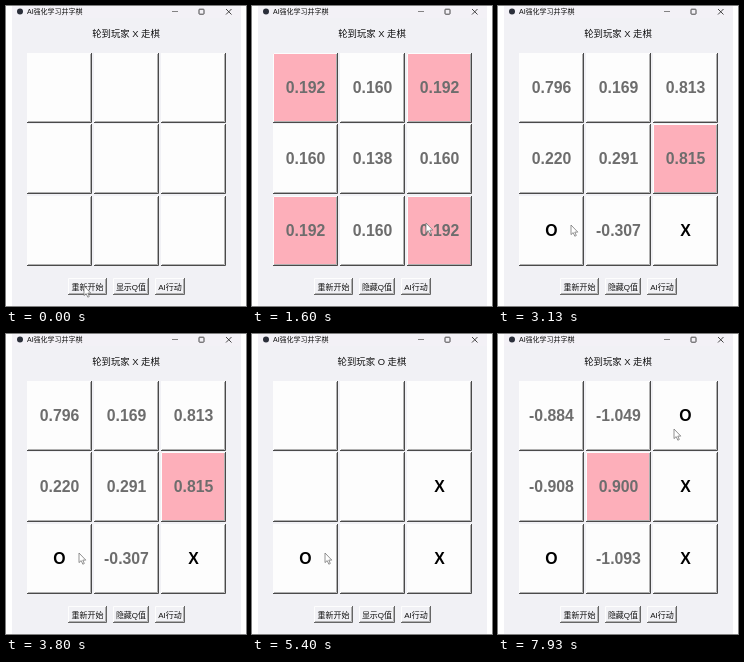
An HTML page for the animation above (8000 ms loop, 240 by 300 pixels).

```html
<!DOCTYPE html>
<html lang="zh-CN">
<head>
<meta charset="utf-8">
<style>
html, body { margin: 0; width: 100%; height: 100%; overflow: hidden; background: #fff; }
svg { display: block; width: 100vw; height: 100vh; }
text { font-family: "Liberation Sans", "Noto Sans CJK SC", "Noto Sans CJK", sans-serif; fill: #111; text-anchor: middle; }
.mark { font-size: 15.8px; font-weight: bold; }
.btn { font-size: 8px; font-weight: 500; }
</style>
</head>
<body>
<svg id="stage" viewBox="0 0 240 300">
  <rect width="240" height="300" fill="#fff"/>
  <rect x="6" width="229" height="300" fill="#f1f1f5"/>
  <rect x="6" width="229" height="12" fill="#f3f1f6"/>
  <circle cx="14" cy="5.5" r="3" fill="#2b2f3a"/>
  <text x="21" y="8.2" font-size="7" style="text-anchor:start">AI强化学习井字棋</text>
  <g fill="none" stroke="#333" stroke-width=".9">
    <path d="M166 5.5h6" stroke="#777"/>
    <path d="M220 3l5.5 5.5M225.5 3l-5.5 5.5"/>
    <rect x="193" y="3.2" width="5" height="5" rx=".6"/>
  </g>
  <text id="status" x="120" y="31.2" font-size="9.4"></text>
</svg>
<script>
const LOOP = 8000;
const PINK = '#fdafba', PLAIN = '#fdfdfd';
const stage = document.getElementById('stage');
const status = document.getElementById('status');

function add(tag, attrs, text = '') {
  const el = document.createElementNS('http://www.w3.org/2000/svg', tag);
  for (const k in attrs) el.setAttribute(k, attrs[k]);
  el.textContent = text;
  stage.append(el);
  return el;
}

// Raised button: light top-left edge, dark bottom-right edge.
function raised(x, y, w, h, fill, dark) {
  const face = add('rect', { x, y, width: w, height: h, fill });
  const edge = (d, stroke) => add('path', { d, stroke, fill: 'none' });
  edge(`M${x + .5} ${y + h - 1}V${y + .5}H${x + w - 1}`, '#fdfdfd');
  edge(`M${x + 1} ${y + h - 1.5}H${x + w - 1.5}V${y + 1}`, '#b0b0b0');
  edge(`M${x} ${y + h - .5}H${x + w - .5}V${y}`, dark);
  return face;
}

const cells = Array.from({ length: 9 }, (_, i) => {
  const x = [21, 88, 155][i % 3], y = [47, 118, 190][Math.floor(i / 3)];
  return {
    face: raised(x, y, 65, 70, PLAIN, '#4a4a4a'),
    label: add('text', { x: x + 32.5, y: y + 40, class: 'mark' })
  };
});

const [, toggle] = [[62, 39, '重新开始'], [107, 36, '显示Q值'], [149, 30, 'AI行动']].map(([x, w, s]) => {
  raised(x, 272, w, 17, '#f1f1f5', '#666');
  return add('text', { x: x + w / 2, y: 283.5, class: 'btn' }, s);
});

const cursor = add('path', {
  d: 'M0 0V9.6L2.2 7.6L3.8 11.2L5.3 10.5L3.8 7.1H6.8Z',
  fill: '#fff', stroke: '#777', 'stroke-width': .8
});

// Board states: start time, turn, nine cells, Q values visible.
const scenes = [
  [0, 'X', '. . . . . . . . .', false],
  [800, 'X', '0.192 0.160 0.192 0.160 0.138 0.160 0.192 0.160 0.192', true],
  [2000, 'O', '. . . . . . . . X', false],
  [2900, 'X', '0.796 0.169 0.813 0.220 0.291 0.815 O -0.307 X', true],
  [4600, 'O', '. . . . . X O . X', false],
  [6000, 'X', '-0.884 -1.049 O -0.908 0.900 X O -1.093 X', true]
];

// Pointer stops: time, x, y.
const stops = [
  [0, 78, 280], [250, 78, 280], [600, 124, 280], [900, 124, 280],
  [1400, 174, 217], [2020, 174, 217], [2370, 75, 218], [2420, 75, 218],
  [2600, 73, 219], [5500, 73, 219], [5950, 176, 95], [LOOP, 176, 95]
];

function pointerAt(t) {
  const i = stops.findIndex(s => s[0] > t);
  const [t0, x0, y0] = stops[i - 1], [t1, x1, y1] = stops[i];
  const p = (t - t0) / (t1 - t0), e = p * p * (3 - 2 * p);
  return [x0 + (x1 - x0) * e, y0 + (y1 - y0) * e];
}

let shown;
function showScene(scene) {
  if (scene === shown) return;
  shown = scene;
  const [, turn, board, showQ] = scene;
  const values = board.split(' ');
  const best = Math.max(...values.map(Number).filter(v => !isNaN(v)));
  status.textContent = `轮到玩家 ${turn} 走棋`;
  toggle.textContent = showQ ? '隐藏Q值' : '显示Q值';
  cells.forEach(({ face, label }, i) => {
    const v = values[i];
    label.textContent = v === '.' ? '' : v;
    label.style.fill = /[XO]/.test(v) ? '#000' : '#6d6d6d';
    face.setAttribute('fill', Number(v) === best ? PINK : PLAIN);
  });
}

function draw(t) {
  showScene(scenes.filter(s => s[0] <= t).pop());
  cursor.setAttribute('transform', `translate(${pointerAt(t)})`);
}

const start = performance.now();
function tick() {
  draw((performance.now() - start) % LOOP);
  requestAnimationFrame(tick);
}
tick();
</script>
</body>
</html>
```
